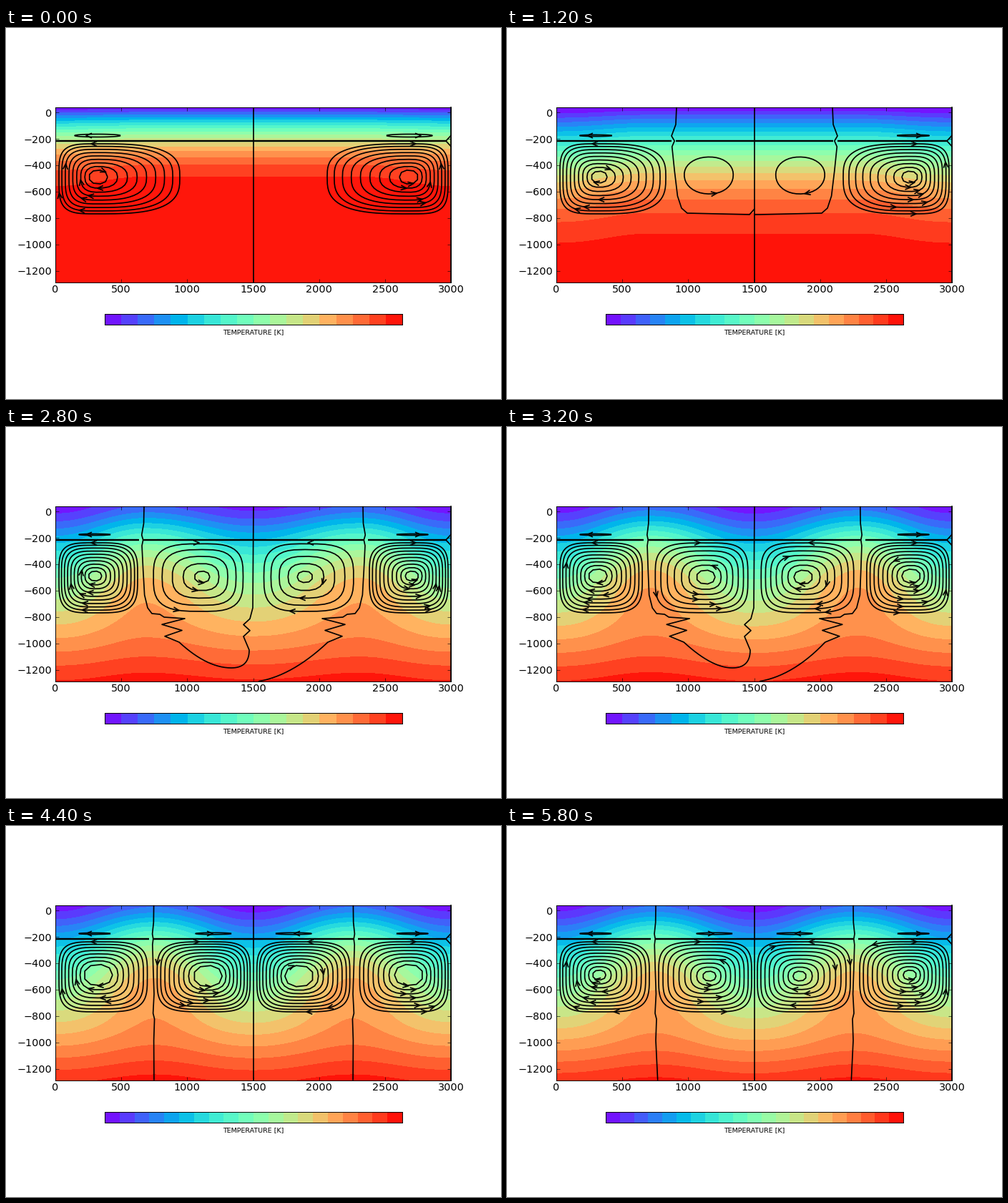
Animation, 692 px wide and 519 px high, one loop 6 s. Source, as a matplotlib script:

```python
import math
import random

import numpy as np
import matplotlib.pyplot as plt
from matplotlib.animation import FuncAnimation
from matplotlib.collections import LineCollection

W, H, FRAMES = 692, 519, 30
LEFT, RIGHT, TOP, BOTTOM = 68.8, 622.4, 110.8, 355.8
MID = W / 2
plt.rcParams["font.family"] = "DejaVu Sans"

xs = np.linspace(0, 3000, 181)
ys = np.linspace(-1288, 40, 150)
erf = np.vectorize(math.erf)


def grow(f, start, end):
    """Smooth step from 0 to 1 between two frames."""
    u = min(max((f - start) / (end - start), 0), 1)
    return u * u * (3 - 2 * u)


def mirror(path):
    return np.asarray(path, float) * [-1, 1] + [W, 0]


def bezier(a, b, c, n=16):
    t = np.linspace(0, 1, n)[:, None]
    a, b, c = map(np.array, (a, b, c))
    return ((1 - t) ** 2 * a + 2 * t * (1 - t) * b + t ** 2 * c).tolist()


def split(f):
    """Pixel x of the boundary between the side and inner cells."""
    return np.interp(f, [0, 6, 10, 14, 19, 29], [258, 237, 202, 193, 206, 208])


def temperature(f):
    # Diffusive cooling that convection later holds nearly steady
    z = 40 - ys
    width = min(math.sqrt(390 ** 2 + 53700 * f), 894 + 4 * f)
    stir = grow(f, 5, 15)
    base = erf(z / width) + stir * (.06 * np.sin(2 * np.pi * z / 1300)
                                    + .07 * np.exp(-z / 80))
    shape = .1 + .9 * np.exp(-((z - 430) / 420) ** 2)

    side = .03 + .09 * grow(f, 0, 14)
    plume = .16 * grow(f, 8, 17)
    centre = .13 * grow(f, 9, 17)
    p = 690 + 60 * grow(f, 14, 19)
    x = np.minimum(xs, 3000 - xs)
    q = np.where(x < p, x / p, (1500 - x) / (1500 - p))
    low = np.where(x < p, side, centre)
    g = -low + (low + plume) * (.5 - .5 * np.cos(np.pi * q)) ** 1.1
    return np.clip(base[:, None] + shape[:, None] * g, .001, .999)


def level_count(f):
    return round(18 + (f / 3 if f < 12 else (f - 14) / 5))


def ring(deg, cx, cy, l, r, t, b, nl, nr):
    """Superellipse with its own extent and power on each side."""
    a = np.radians(deg)
    c, s = np.cos(a), np.sin(a)
    n = 2 / np.where(c < 0, nl, nr)
    return np.stack([cx + np.where(c < 0, l - cx, r - cx) * np.abs(c) ** n,
                     cy + np.where(s < 0, t - cy, b - cy) * np.abs(s) ** n], -1)


def head(x, y, ang):
    """Open arrowhead centred on (x, y)."""
    c, s = np.cos(ang), np.sin(ang)
    wing = np.array([[-4, -3.3], [4, 0], [-4, 3.3]])
    return wing @ np.array([[c, s], [-s, c]]) + [x, y]


def vortex(box, core, radius, count, powers, sense, rng):
    """Nested rings from the outer box to the core, with scattered arrows."""
    cx, cy = core
    outer = np.array([*box, *powers])
    inner = np.array([cx - radius, cx + radius, cy - .75 * radius, cy + .75 * radius,
                      2.2, 2.2])
    paths = []
    for k in range(count):
        args = outer + (inner - outer) * (k / max(count - 1, 1)) ** 1.12
        sides = max(10 + 9 * (count - 1 - k), 40 if count < 4 else 10)
        paths.append(ring(np.linspace(0, 360, sides), cx, cy, *args))
        if rng.random() < .8:
            low = rng.random() < .75
            deg = rng.uniform(75, 118) if low else rng.choice([165, 190, 300])
            d = sense * (ring(deg + 3, cx, cy, *args) - ring(deg - 3, cx, cy, *args))
            paths.append(head(*ring(deg, cx, cy, *args), np.arctan2(d[1], d[0])))
    return paths


def core_radius(f):
    return 13 + 7 * math.sin(2 * math.pi * (f - 16) / 22) * min(f / 6, 1)


def side_cell(f, rng):
    right = split(f) - 15 + 6 * grow(f, 9, 14)
    r = core_radius(f)
    count = round((49 - .75 * r) / 4.9) + 1
    core = 72 + min(.47 * (right - 72), 57), 208.5
    return vortex((74, right, 162, 260), core, r, count,
                  (4, 3 + .8 * grow(f, 4, 14)), 1, rng)


def inner_cell(f, rng):
    size = 1 - (1 - min(max(f - 1, 0) / 16, 1)) ** 2
    count = round(9 * min(max(f - 2, 0) / 16, 1) ** 2)
    cx, cy = (split(f) + MID) / 2 - 20 * (1 - size), 211 - 10 * (1 - size)
    hw, hh = 65 * size, 49 * size
    power = 2.1 + 1.8 * grow(f, 8, 18)
    return vortex((cx - hw, cx + hw, cy - hh, cy + hh), (cx + 6 * size ** 3, cy - 1),
                  max(core_radius(f), hw - 13 * (count - 1)), count,
                  (power, power), -1, rng)


def flat(cx, half, h, tip, ang):
    a = np.linspace(0, 2 * np.pi, 40)
    return [np.stack([cx + half * np.cos(a), 150.5 + h * np.sin(a)], -1),
            head(tip, 150.5, ang)]


def separators(f):
    s = split(f)
    k = 7 - 5 * grow(f, 6, 18)
    centre = [[MID, TOP], [MID, BOTTOM]]
    if f < 3:
        return [centre]
    top = [[s, TOP], [s - .15 * k, 135], [s - k, 151], [s - .4 * k, 158],
           [s - .9 * k, 166], [s - .4 * k, 200], [s + .2 * k, 235]]
    if f < 9:
        floor = top + [[s + 7, 252], [s + 15, 259], [339, 261]]
        return [centre, floor + [[MID, 253]], mirror(floor + [[MID, 261]])]
    if f >= 17:
        side = top + [[s - 1, 262], [s + 1, 270], [s, 300], [s + (f - 21) / 3, BOTTOM]]
        return [centre, side, mirror(side)]

    # Zigzag below the cells, then a sweep towards the middle
    zig = top + [[s + 5, 253], [s + 11, 261], [s + 22, 262], [s + 28, 266]]
    zig += [[s + 40 + (-1) ** i * (17 - 2 * i), 268 + 8.25 * i] for i in range(5)]
    late = grow(f, 10, 14)
    low = [335 - 20 * late, 346 - 9 * late]
    sweep = bezier(zig[-1], [s + 88, low[1]], low)
    sweep += bezier(low, [344 - 4 * late, low[1]], [345 - 5 * late, 312])
    sway = late > .4
    sweep += [[345 - sway * (8.5 + 4.5 * (-1) ** i), 293 - 8.25 * i] for i in range(4)]
    sweep += [[345, 253], [MID, TOP]]
    twin = mirror(zig).tolist()
    return [zig + sweep, twin + bezier(twin[-1], [400, 348], [353, BOTTOM])]


def flow(f):
    rng = random.Random(40 + f)
    paths = side_cell(f, rng)
    paths += [mirror(p) for p in side_cell(f, rng)]
    paths += inner_cell(f, rng)
    paths += [mirror(p) for p in inner_cell(f, rng)]

    start = math.exp(-f / 2)
    both = flat(124 + 4 * start, 22 + 10 * start, 1 + start, 116, np.pi)
    both.append(head(123, 162, np.pi))
    if f >= 14:
        both.append(head(266, 162, 0))
    if f >= 17:
        both += flat(290, 25, 1.2, 285, 0)
    paths += both + [mirror(p) for p in both] + separators(f)
    paths.append([[RIGHT, 150], [615, 158], [RIGHT, 166]])
    return paths


def layer_lines(f):
    if f < 3:
        return [[[LEFT, 158], [615, 158]]]
    a, b = split(f) - 7, split(f) - 1
    return [[[LEFT, 158], [a, 158]], [[b, 158], [W - b, 158]], [[W - a, 158], [615, 158]]]


fig = plt.figure(figsize=(8, 6), dpi=86.5, facecolor="white")
ax = fig.add_axes([LEFT / W, 1 - BOTTOM / H, (RIGHT - LEFT) / W, (BOTTOM - TOP) / H])
ax.set(xlim=(0, 3000), ylim=(-1288, 40))
ax.set_xticks(range(0, 3001, 500))
ax.set_yticks(range(-1200, 1, 200))
ax.tick_params(direction="in", top=True, right=True, length=4, width=.5, labelsize=12)
ax.tick_params(axis="x", pad=3)
ax.tick_params(axis="y", pad=4)
ax.set_axisbelow(False)

bar = fig.add_axes([.2, 1 - 415.3 / H, .6, 15.3 / H])
bar.set(xticks=[], yticks=[])
strip = bar.imshow(np.zeros((1, 18, 3)), extent=(0, 1, 0, 1), aspect="auto",
                   interpolation="nearest")
fig.text(.4995, 1 - 428.3 / H, "TEMPERATURE [K]", size=7.9, ha="center", va="baseline")

over = fig.add_axes([0, 0, 1, 1])
over.set(xlim=(0, W), ylim=(H, 0))
over.axis("off")
clip = plt.Rectangle((LEFT - .6, TOP - .6), RIGHT - LEFT + 1.2, BOTTOM - TOP + 1.2,
                     transform=over.transData)
streams = LineCollection([], colors="black", linewidths=1.4, joinstyle="round")
layer = LineCollection([], colors="black", linewidths=2)
for lines in (streams, layer):
    over.add_collection(lines)
    lines.set_clip_path(clip)
over.plot([RIGHT, RIGHT], [TOP, BOTTOM], color="black", lw=1.4)

bands = None


def update(f):
    global bands
    if bands is not None:
        bands.remove()
    n = level_count(f)
    colors = plt.cm.rainbow((np.arange(n) + .5) / n)
    bands = ax.contourf(xs, ys, temperature(f), levels=np.linspace(0, 1, n + 1),
                        colors=colors, zorder=0)
    strip.set_data(colors[None, :, :3])
    streams.set_segments([np.asarray(p, float) for p in flow(f)])
    layer.set_segments(layer_lines(f))
    return []


anim = FuncAnimation(fig, update, frames=FRAMES, interval=200,
                     init_func=lambda: [], repeat=True, repeat_delay=0)
plt.show()
```
